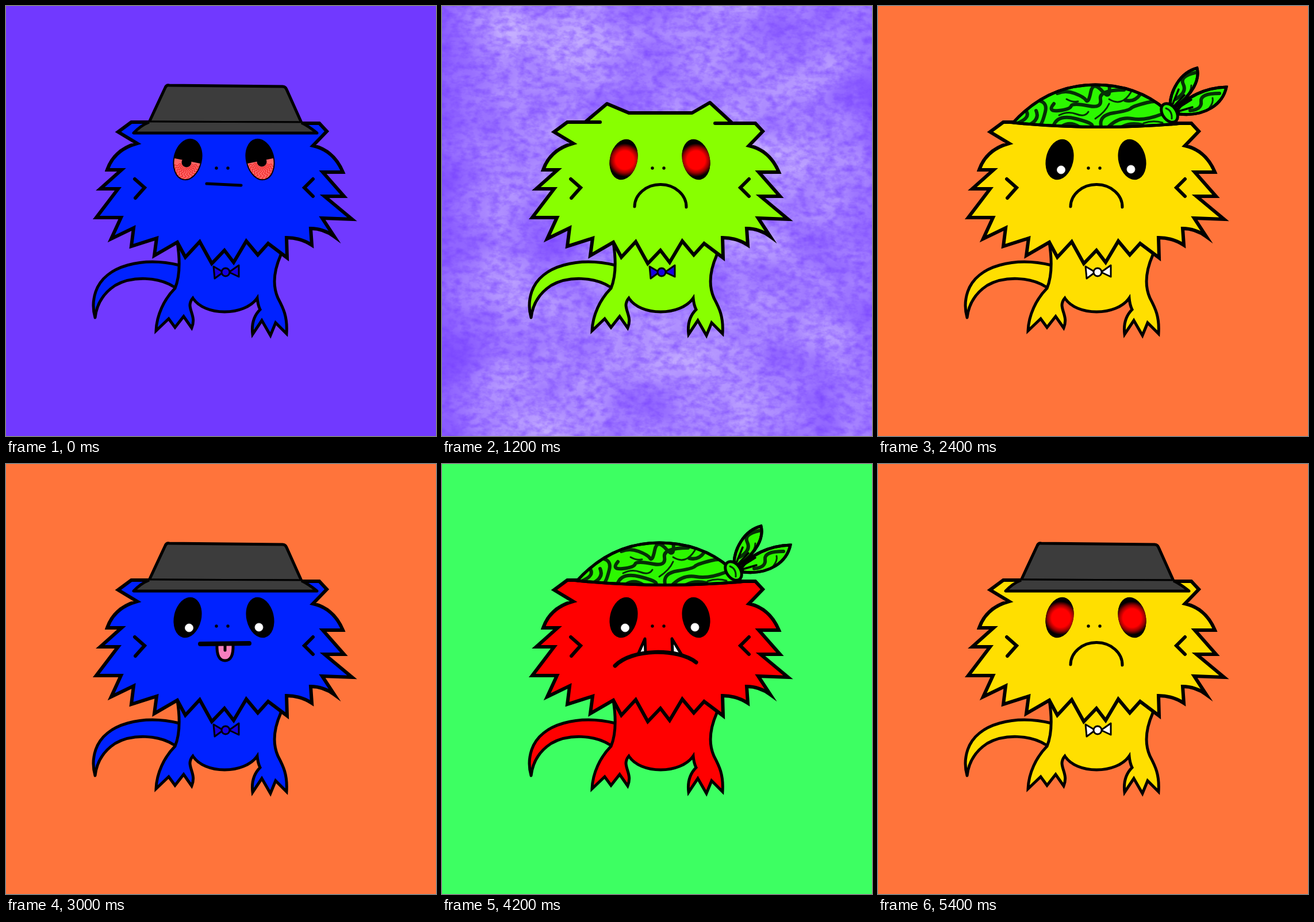
An HTML page for the animation above (6000 ms loop, 748 by 748 pixels).

```html
<!DOCTYPE html>
<html lang="en">
<head>
<meta charset="utf-8">
<title>Spiky lizard wardrobe</title>
<style>
  html, body { margin: 0; width: 100%; height: 100%; overflow: hidden; }
  svg { display: block; width: 100%; height: 100%; }
  .line { fill: none; stroke: #000; stroke-linecap: round; }
  .skin { fill: var(--skin); stroke: #000; stroke-width: 6; stroke-miterlimit: 10; }
  .cloth { fill: var(--cloth); stroke: #000; stroke-width: 5; stroke-linejoin: round; }
  .print { fill: none; stroke: var(--print); stroke-linecap: round; }
  .part { display: none; }
</style>
</head>
<body>
<svg id="stage" viewBox="0 0 748 748">
  <defs>
    <filter id="mottle" x="0" y="0" width="1" height="1" color-interpolation-filters="sRGB">
      <feTurbulence type="fractalNoise" baseFrequency=".007 .009" numOctaves="5" seed="8"/>
      <feColorMatrix values="0 0 0 0 1  0 0 0 0 1  0 0 0 0 1  .6 0 0 0 .1"/>
    </filter>
    <filter id="grain" x="0" y="0" width="1" height="1" color-interpolation-filters="sRGB">
      <feTurbulence type="fractalNoise" baseFrequency=".06 .09" numOctaves="4" seed="3"/>
      <feColorMatrix values="0 0 0 0 .443  0 0 0 0 .224  0 0 0 0 1  1.1 0 0 0 -.4"/>
    </filter>
    <linearGradient id="edges">
      <stop offset="0" stop-color="#7139ff" stop-opacity=".55"/>
      <stop offset=".14" stop-color="#7139ff" stop-opacity="0"/>
      <stop offset=".9" stop-color="#7139ff" stop-opacity="0"/>
      <stop offset="1" stop-color="#7139ff" stop-opacity=".3"/>
    </linearGradient>
    <radialGradient id="ember">
      <stop offset=".55" stop-color="#f00"/>
      <stop offset=".78" stop-color="#900"/>
      <stop offset="1" stop-color="#000"/>
    </radialGradient>
    <radialGradient id="softWhite">
      <stop offset=".88" stop-color="#fff"/>
      <stop offset="1" stop-color="#fff" stop-opacity="0"/>
    </radialGradient>
    <ellipse id="leftEye" cx="316" cy="267" rx="23.8" ry="35.8" transform="rotate(13 316 267)"/>
    <ellipse id="rightEye" cx="442" cy="267" rx="23.8" ry="35.8" transform="rotate(-13 442 267)"/>
    <clipPath id="inLeft"><use href="#leftEye"/></clipPath>
    <clipPath id="inRight"><use href="#rightEye"/></clipPath>
    <path id="dome" d="M235 203Q295 137 378 137Q450 137 500 180L520 205Q380 217 235 203Z"/>
    <path id="leafUp" d="M508 174C508 150 524 116 555 108C560 128 548 154 514 178Z"/>
    <path id="leafSide" d="M520 182C535 158 570 142 606 141C600 170 570 193 524 188Z"/>
    <clipPath id="inCloth"><use href="#dome"/><use href="#leafUp"/><use href="#leafSide"/></clipPath>
  </defs>

  <rect id="backdrop" width="748" height="748"/>
  <g class="part" id="texture">
    <rect width="748" height="748" filter="url(#mottle)"/>
    <rect width="748" height="748" filter="url(#grain)"/>
    <rect width="748" height="748" fill="url(#edges)"/>
  </g>

  <g class="skin">
    <path style="stroke-width:5;stroke-linejoin:round" d="M302 451C240 436 172 450 156 497C151 512 151 528 155 542C157 525 164 503 190 486C220 469 265 471 293 489"/>
    <path style="stroke-width:5" d="M298 411Q306 462 294 491C275 510 262 538 261 565L283 544 294 559 309 540 323 560C330 543 321 534 320 521Q320 514 325 508C345 540 415 540 437 508Q438 520 442 528C430 540 427 555 429 571L445 547 460 573 469 551 488 570C490 540 482 525 473 508C465 490 464 465 478 433V400"/>
    <path stroke-linecap="round" stroke-linejoin="round" d="M249 202L287 170 325 186H435L466 168 503 202"/>
    <path stroke="none" d="M270 192H480V215H270Z"/>
    <path stroke-linecap="round" d="M275 202H218L195 219 228 239Q188 250 176 285H201L164 318H195L157 368H200L183 405 222 386 218 418 262 404 258 434 298 411 312 437 337 410 358 448 380 425 396 446 418 409 438 433 456 413 489 438 488 403Q512 403 532 416L530 387Q552 387 571 401L550 369 602 371 554 331H588L551 289H586Q570 251 534 243L558 218 545 204H475"/>
  </g>
  <path class="line" stroke-width="6" d="M224 301L241 316 225 334M534 301L519 316 534 331"/>
  <circle cx="366" cy="282" r="2.7"/>
  <circle cx="386" cy="282" r="2.7"/>
  <use href="#leftEye"/>
  <use href="#rightEye"/>

  <g class="part" id="beady" fill="#fff" stroke="#ddd">
    <circle cx="318.5" cy="285" r="7"/>
    <circle cx="440" cy="284" r="7"/>
  </g>
  <g class="part" id="glowing" fill="url(#ember)">
    <g clip-path="url(#inLeft)"><circle cx="318" cy="268" r="29"/></g>
    <g clip-path="url(#inRight)"><circle cx="442" cy="268" r="29"/></g>
  </g>
  <g class="part" id="ringed">
    <g fill="url(#softWhite)"><circle cx="317" cy="271" r="20"/><circle cx="440" cy="268" r="20"/></g>
    <g fill="#f00"><circle cx="314" cy="271" r="13.5"/><circle cx="438" cy="268" r="13.5"/></g>
  </g>
  <g class="part" id="sleepy">
    <g clip-path="url(#inLeft)">
      <path fill="#ff6464" d="M288 264L338 274V305H288Z"/>
      <g class="veins" data-x="314" data-y="272"></g>
    </g>
    <g clip-path="url(#inRight)">
      <path fill="#ff6464" d="M470 264L420 274V305H470Z"/>
      <g class="veins" data-x="445" data-y="271"></g>
    </g>
    <circle cx="314" cy="272" r="8.5"/>
    <circle cx="445" cy="271" r="8.5"/>
    <g fill="none" stroke="#000" stroke-width="2"><use href="#leftEye"/><use href="#rightEye"/></g>
  </g>

  <path class="part line" id="flat" stroke-width="5" d="M349 309L409 312"/>
  <path class="part line" id="frown" stroke-width="5" d="M335 349A45 39 0 0 1 425 350"/>
  <g class="part line" id="tongue" stroke-width="5">
    <path fill="#f77fbe" d="M367 314Q366 342 381 342Q396 342 395 314"/>
    <path d="M381 316V324"/>
    <path stroke-width="8" d="M338 313L423 312"/>
  </g>
  <g class="part line" id="fangs" stroke-width="5" stroke-linejoin="round">
    <path fill="#fff" d="M341 331L353 304 354 329ZM400 304L401 328 417 332Z"/>
    <path stroke-width="7" d="M301 351C330 321 410 320 442 345"/>
  </g>

  <g class="part" id="bow" stroke="#000" stroke-width="3" stroke-linejoin="round">
    <path d="M361 453L363 474 378 463ZM405 451V471L388 463Z"/>
    <circle cx="382" cy="463" r="7"/>
  </g>

  <g class="part" id="brimmed" fill="#3c3c3c" stroke="#000" stroke-width="5" stroke-linejoin="round">
    <path d="M249 202L277 142Q279 137 284 138L481 140Q486 140 488 145L514 203Z"/>
    <path d="M249 202Q234 208 222 221H541Q528 210 514 203"/>
    <path stroke-width="3" d="M249 201L514 202"/>
  </g>

  <g class="part" id="bandana">
    <g class="cloth"><use href="#dome"/><use href="#leafUp"/><use href="#leafSide"/></g>
    <g clip-path="url(#inCloth)" class="print">
      <g stroke-width="6">
        <path d="M242 204Q268 194 256 180M272 164Q296 164 291 184T282 207"/>
        <path d="M262 207Q282 198 275 182"/>
        <path d="M312 152Q326 146 342 152T362 164T370 150T390 148T402 136"/>
        <path d="M306 170Q294 184 314 182T336 174T368 174Q390 178 387 162T428 146"/>
        <path d="M305 209Q312 188 344 196T372 209"/>
        <path d="M320 209Q334 200 350 210"/>
        <path d="M388 209Q384 190 410 186T440 178T468 168T500 174"/>
        <path d="M402 209Q420 192 442 196T494 188"/>
        <path d="M425 210Q440 202 460 207M430 164Q446 168 456 154"/>
        <path d="M518 162Q538 150 531 136T552 116M543 182Q564 180 562 166T594 152"/>
      </g>
      <g stroke-width="3">
        <path d="M315 190Q330 182 345 188T366 184M402 162Q424 176 440 150"/>
        <path d="M462 204Q478 198 495 203M378 196Q396 184 402 170M328 162Q338 168 348 166"/>
        <path d="M537 156Q545 148 545 138M576 178Q584 168 582 160"/>
      </g>
    </g>
    <g fill="none" stroke="#000" stroke-width="5">
      <use href="#dome"/><use href="#leafUp"/><use href="#leafSide"/>
      <path stroke-width="3.5" stroke-linecap="round" d="M512 172L523 145M515 174L533 155M518 180L545 163M520 184L547 176"/>
    </g>
    <ellipse class="cloth" cx="507" cy="186" rx="12" ry="18" transform="rotate(-35 507 186)"/>
    <path class="print" stroke-width="3" d="M501 178Q512 182 511 196"/>
  </g>
  <circle class="part" id="speck" cx="700.5" cy="20" r="2.7" fill="#29204a"/>

  <g class="part" id="party">
    <path fill="#e800ff" stroke="#000" stroke-width="3" d="M372 91L341 193Q350 209 383 210Q412 208 426 196L382 91Z"/>
    <g id="pompom" stroke="#fdd406" stroke-width="1.4"><circle cx="375" cy="72" r="23" fill="#fdd406"/></g>
  </g>
</svg>

<script>
const SCENE_MS = 600;
const SKIN = { blue: '#0022ff', lime: '#88ff00', red: '#ff0000', gold: '#ffdf00' };
const BACK = { purple: '#7139ff', orange: '#ff743b', green: '#3dff62' };
const CLOTH = { grey: ['#292929', '#777'], green: ['#2cf800', '#062f06'] };
const BOW = { blue: '#1600e0', white: '#fff' };

// backdrop, skin, hat, eyes, mouth, bow, cloth, extra part
const scenes = [
  ['purple', 'blue', 'brimmed', 'sleepy', 'flat', 'blue'],
  ['purple', 'red', 'bandana', 'beady', 'frown', 'white', 'green'],
  ['purple', 'lime', '', 'glowing', 'frown', 'blue', '', 'texture'],
  ['purple', 'blue', 'bandana', 'beady', 'frown', 'white', 'grey', 'speck'],
  ['orange', 'gold', 'bandana', 'beady', 'frown', 'white', 'green'],
  ['orange', 'blue', 'brimmed', 'beady', 'tongue', 'blue'],
  ['green', 'blue', 'party', 'beady', 'frown', 'white'],
  ['green', 'red', 'bandana', 'beady', 'fangs', '', 'green'],
  ['purple', 'blue', 'party', 'ringed', 'frown', 'white'],
  ['orange', 'gold', 'brimmed', 'glowing', 'frown', 'white'],
];

const stage = document.getElementById('stage');
const byId = id => document.getElementById(id);
const parts = [...document.querySelectorAll('.part')];

function addPath(parent, d) {
  const path = document.createElementNS(stage.namespaceURI, 'path');
  path.setAttribute('d', d);
  parent.append(path);
}

const polar = (x, y, angle, r) =>
  `${(x + r * Math.cos(angle)).toFixed(1)} ${(y + r * Math.sin(angle)).toFixed(1)}`;

// Fuzzy rim of the pompom
for (let i = 0; i < 150; i++) {
  const angle = i * Math.PI / 75;
  const length = 26 + 8 * Math.abs(Math.sin(i * i * 1.7));
  addPath(byId('pompom'), `M${polar(375, 72, angle, 18)}L${polar(375, 72, angle + .06, length)}`);
}

// Wavy veins radiating from each pupil
for (const group of document.querySelectorAll('.veins')) {
  const x = +group.dataset.x, y = +group.dataset.y;
  group.setAttribute('fill', 'none');
  group.setAttribute('stroke', '#e31616');
  for (let i = 0; i < 12; i++) {
    const angle = .3 + i * .23;
    let d = `M${polar(x, y, angle, 9)}`;
    for (let k = 1; k < 7; k++) d += `L${polar(x, y, angle + (k % 2 ? .12 : -.08), 9 + k * 4)}`;
    addPath(group, d);
  }
}

function show([back, skin, hat, eyes, mouth, bow, cloth, extra]) {
  const visible = [hat, eyes, mouth, extra, bow && 'bow'];
  for (const part of parts) part.style.display = visible.includes(part.id) ? 'inline' : 'none';
  byId('backdrop').setAttribute('fill', BACK[back]);
  byId('bow').setAttribute('fill', BOW[bow] || 'none');
  const [base, print] = CLOTH[cloth] || CLOTH.grey;
  stage.style.setProperty('--skin', SKIN[skin]);
  stage.style.setProperty('--cloth', base);
  stage.style.setProperty('--print', print);
}

let current = -1;
function tick() {
  const index = Math.floor(performance.now() / SCENE_MS) % scenes.length;
  if (index !== current) show(scenes[current = index]);
  requestAnimationFrame(tick);
}
tick();
</script>
</body>
</html>
```
